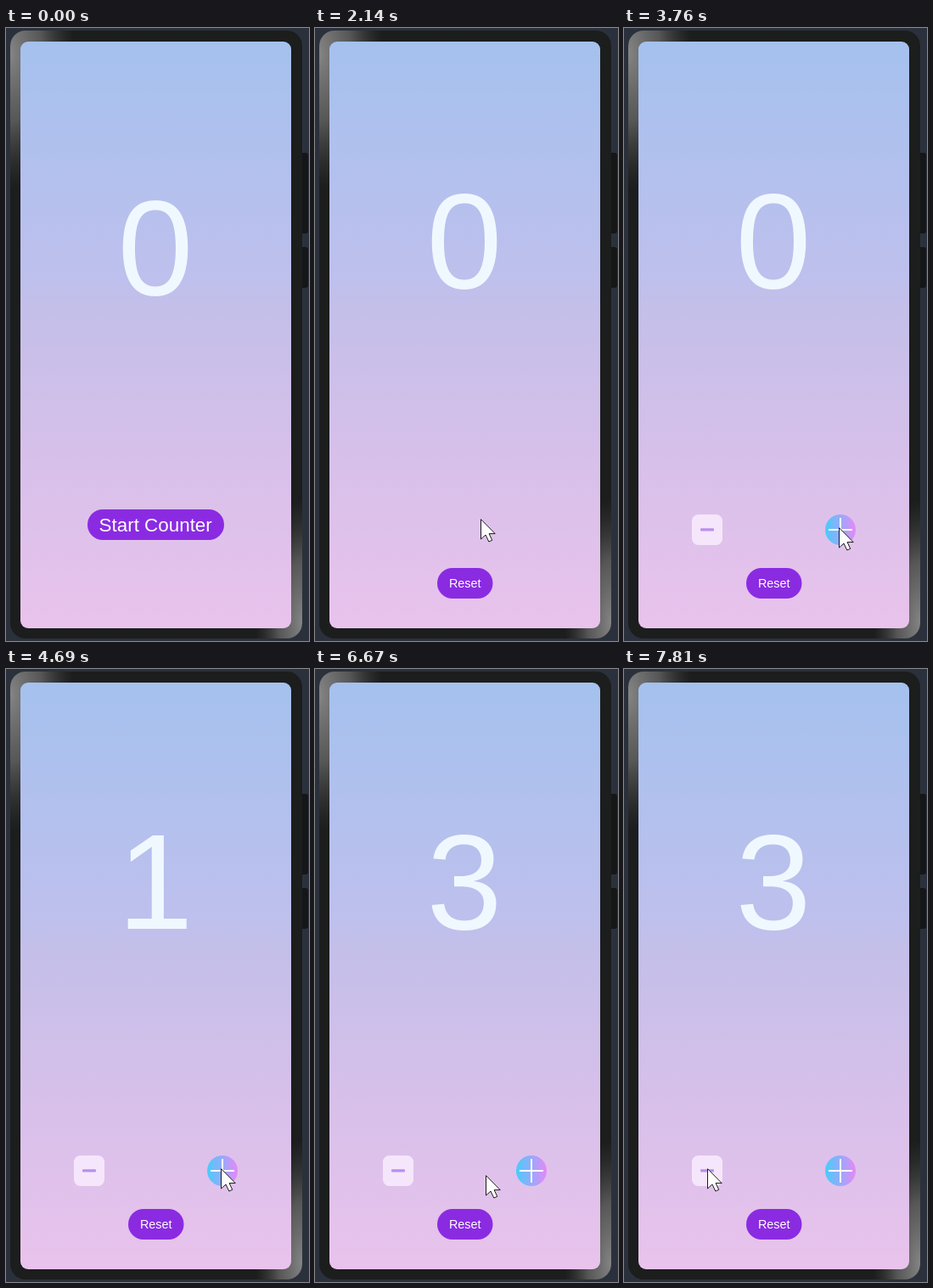
These frames come from a looping animation (357x722 px, 8 s). An HTML page:

```html
<!DOCTYPE html>
<html lang="en">
<head>
<meta charset="utf-8">
<title>Counter</title>
<style>
  html, body { margin: 0; width: 100%; height: 100%; overflow: hidden; background: #2b313c; }
  svg { display: block; width: 357px; height: 722px; }
  text { font-family: "Liberation Sans", Arial, sans-serif; text-anchor: middle; fill: #fff; }
</style>
</head>
<body>
<svg viewBox="0 0 357 722">
  <defs>
    <linearGradient id="sky" x2="0" y2="1">
      <stop offset="0" stop-color="#a5c1ee"/>
      <stop offset=".4" stop-color="#bec0ed"/>
      <stop offset=".46" stop-color="#c4bfe9"/>
      <stop offset=".7" stop-color="#d6c0ea"/>
      <stop offset="1" stop-color="#e9c3ec"/>
    </linearGradient>
    <linearGradient id="plusFill">
      <stop offset="0" stop-color="#48ccfb"/>
      <stop offset="1" stop-color="#e688f8"/>
    </linearGradient>
    <radialGradient id="shine">
      <stop offset="0" stop-color="#858585"/>
      <stop offset=".5" stop-color="#6a6a6a" stop-opacity=".75"/>
      <stop offset="1" stop-color="#444" stop-opacity="0"/>
    </radialGradient>
    <clipPath id="body"><rect x="5" y="3" width="344" height="716" rx="18"/></clipPath>
  </defs>

  <rect width="357" height="722" fill="#2b313c"/>
  <g fill="#151617">
    <rect x="345" y="147" width="11" height="95" rx="3"/>
    <rect x="345" y="258" width="11" height="48" rx="3"/>
  </g>
  <g clip-path="url(#body)">
    <rect x="5" y="3" width="344" height="716" fill="#1c1d1d"/>
    <ellipse cx="5" cy="30" rx="75" ry="160" fill="url(#shine)"/>
    <ellipse cx="349" cy="700" rx="55" ry="145" fill="url(#shine)"/>
  </g>
  <rect x="17" y="16" width="319" height="691" rx="9" fill="url(#sky)"/>

  <text id="count" x="176" font-size="160" style="fill:#f0f8ff">0</text>

  <g id="start">
    <rect x="96" y="567" width="161" height="36" rx="18" fill="#8a2be2"/>
    <text x="176.2" y="593" font-size="22.4">Start Counter</text>
  </g>

  <g id="reset">
    <rect x="144" y="636" width="65.5" height="36" rx="18" fill="#8a2be2"/>
    <text x="176.7" y="659" font-size="14.4">Reset</text>
  </g>

  <g id="icons">
    <rect x="80" y="573" width="36" height="36" rx="7.5" fill="#f5e6fb"/>
    <rect x="90" y="589.2" width="16" height="3.4" rx="1" fill="#b98ff0"/>
    <circle cx="255" cy="591" r="18" fill="url(#plusFill)"/>
    <path d="M241 591h28M255 577v28" stroke="#fff" stroke-width="2"/>
  </g>

  <g id="cursor">
    <path d="M.5.7V24L6 19 9.8 27 13.7 25.3 10.1 17.6H17.2Z" fill="#fff" stroke="#1a1a1a" stroke-linejoin="round"/>
    <circle id="press" r="18" fill="#ff0" fill-opacity=".5"/>
  </g>
</svg>
<script>
const LOOP = 8000;
const el = id => document.getElementById(id);
const [count, start, reset, icons, cursor, press] =
  ["count", "start", "reset", "icons", "cursor", "press"].map(el);

// Each move: begin and end time, number of steps, ease-out power, from, to, vertical bow.
const moves = [
  { t0: 530, t1: 1220, n: 11, p: 2, from: [316, 728], to: [195, 578], bow: 0 },
  { t0: 2880, t1: 3280, n: 7, p: 1.64, from: [195, 578], to: [253, 588], bow: -0.4 },
  { t0: 6670, t1: 7280, n: 10, p: 3.87, from: [253, 588], to: [98, 588], bow: 9 }
];
const presses = [[1760, 1880], [3610, 3760], [4490, 4690], [5550, 5740], [7680, 7810]];
const ticks = [4020, 4880, 5940];

const show = (node, on) => node.setAttribute("visibility", on ? "inherit" : "hidden");

function pointer(t) {
  const m = moves.filter(m => t >= m.t0).pop();
  if (!m) return null;
  const k = Math.min(m.n, 1 + Math.floor((t - m.t0) / (m.t1 - m.t0) * (m.n - 1) + 1e-6));
  const e = 1 - Math.pow(1 - k / m.n, m.p);
  const mix = i => m.from[i] + (m.to[i] - m.from[i]) * e;
  return [mix(0), mix(1) + m.bow * 4 * e * (1 - e)];
}

function draw(t) {
  const counting = t >= 2140;
  count.textContent = ticks.filter(x => t >= x).length;
  count.setAttribute("y", counting ? 306 : 313.5);
  show(start, !counting);
  show(reset, counting);
  show(icons, t >= 2210);

  const at = pointer(t);
  show(cursor, at);
  if (at) cursor.setAttribute("transform", `translate(${at.map(Math.round)})`);
  show(press, presses.some(([a, b]) => t >= a && t < b));
}

const origin = performance.now();
function frame() {
  draw((performance.now() - origin) % LOOP);
  requestAnimationFrame(frame);
}
frame();
</script>
</body>
</html>
```
